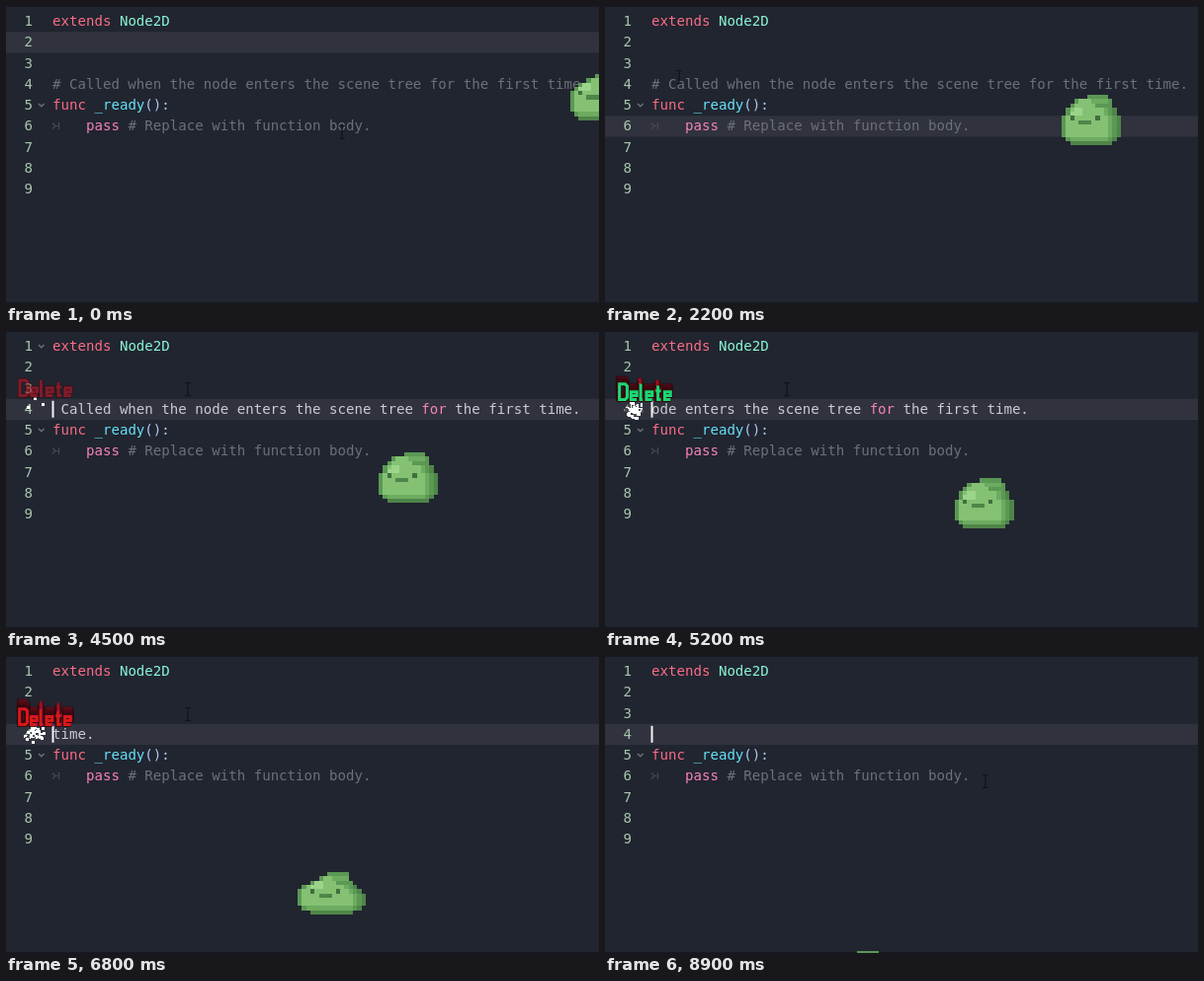
Recreate the animation shown at these times as an HTML page. Size 600x301 px, loop 9 s.

```html
<!DOCTYPE html>
<html lang="en">
<head>
<meta charset="utf-8">
<title>Editor with a slime</title>
<style>
  html, body { margin: 0; width: 100%; height: 100%; overflow: hidden; background: #212530; }
  svg { display: block; width: 600px; height: 301px; }
  text { font: 14.1px "DejaVu Sans Mono", "Liberation Mono", monospace; white-space: pre; }
  .key { fill: #fa6c84; } .type { fill: #88f5d3; } .comment { fill: #6c7079; }
  .fn { fill: #66e0f8; } .sym { fill: #abc9f5; } .flow { fill: #f583b8; }
  .plain { fill: #c9cbd0; } .num { fill: #a9c6ae; }
</style>
</head>
<body>
<svg id="stage" viewBox="0 0 600 301" xmlns="http://www.w3.org/2000/svg">
  <rect width="600" height="301" fill="#212530"/>
  <rect id="row" width="600" height="21.3" fill="#30323d"/>
  <path d="M0 .5H600M0 300.5H600" stroke="#171a25"/>
  <g id="code"></g>
  <g fill="none" stroke="#6c7078" stroke-width="1.4">
    <path id="fold" d="M33 14l2.800 2.800 2.800-2.800"/>
    <path d="M33 99l2.800 2.800 2.800-2.800"/>
    <path d="M47 118.500l3 3-3 3M53.500 118v7M50.500 121.500h2" stroke="#464a54" stroke-width="1.2"/>
  </g>
  <text id="line4" x="47" y="84"></text>
  <rect id="caret" width="2" height="17" fill="#f2f3f5"/>
  <g id="slime" shape-rendering="crispEdges"></g>
  <g id="burst" shape-rendering="crispEdges"></g>
  <g id="labels"></g>
  <path id="beam" d="M-3-6.500h2.500l.5.500.5-.500H3M0-6V6M-3 6.500h2.500L0 6l.500.500H3" fill="none" stroke="#101218" stroke-width="1.2"/>
  <path id="arrow" d="M0 0V15l3.500-3 2.500 5 2.500-1-2.300-5H11Z" fill="#fff" stroke="#22252d" stroke-width=".6"/>
</svg>
<script>
const LOOP = 9000, STEP = 100, LINE = 21.25, CHAR = 8.49, PIXEL = 4.27;
const el = id => document.getElementById(id);
const span = (cls, s) => `<tspan class="${cls}">${s}</tspan>`;
const rect = (x, y, w, h, fill) => `<rect x="${x}" y="${y}" width="${w}" height="${h}" fill="${fill}"/>`;
const rowTop = n => 5 + LINE * (n - 1);
const baseline = n => rowTop(n) + 15.2;
const noise = n => { const v = Math.sin(n * 127.1 + 3.7) * 43758.5453; return v - Math.floor(v); };

const COMMENT = "# Called when the node enters the scene tree for the first time.";
const CLICK_BODY = 200, CLICK_COMMENT = 3500, FIRST_DELETE = 4100, LAST_DELETE = 7000;
const BURST_LIFE = 480, LABEL_LIFE = 1000;

// Each track lists [time, value...]; values are interpolated linearly.
const deletions = [[4500, 1], [5800, 35.3], [6800, 59.5], [7000, 64]];
const mouse = [[0, 340, 128], [200, 385, 123], [1100, 380, 124], [2200, 75, 72], [2900, 46, 79],
  [3700, 46, 79], [4400, 184, 59], [8000, 184, 59], [8700, 385, 127]];
const slimePath = [[0, 600, 116], [2200, 492, 141], [3200, 442.5, 152], [3610, 422.5, 156.5],
  [4040, 422.5, 156.5], [4500, 407, 174], [5800, 363.5, 223], [6800, 329.5, 262], [8900, 259.5, 342]];

function track(keys, t) {
  if (t <= keys[0][0]) return keys[0].slice(1);
  const i = keys.findIndex(k => k[0] > t);
  if (i < 0) return keys[keys.length - 1].slice(1);
  const a = keys[i - 1], b = keys[i], f = (t - a[0]) / (b[0] - a[0]);
  return a.slice(1).map((v, j) => v + (b[j + 1] - v) * f);
}

const deletedAt = t => t < FIRST_DELETE ? 0 : Math.floor(track(deletions, t)[0]);
const deleteTimes = [];
for (let t = FIRST_DELETE; t <= LAST_DELETE; t += 2)
  while (deleteTimes.length < deletedAt(t)) deleteTimes.push(t);

// Slime poses: size in px, left and right inset of each pixel row, and face position in cells.
const low = { w: 59, h: 47, left: "64210000012", right: "33321000013", eye: [2, 4], mouth: 5 };
const normal = { w: 60, h: 51, left: "632110000012", right: "322110000012", eye: [2, 5], mouth: 6 };
const tall = { w: 51, h: 55, left: "5311000000012", right: "2211000000012", eye: [1, 5], mouth: 6 };
const flat = { w: 69, h: 43, left: "7531000013", right: "4432100013", eye: [3, 4], mouth: 5 };
const hop = [low, normal, tall, normal, low, flat, flat];

function slimeMarkup(pose) {
  const rows = pose.left.length, cols = Math.round(pose.w / PIXEL);
  const [ex, ey] = pose.eye;
  const dark = "#4f8549", edge = "#5b9854", shade = "#6dab60", body = "#84c173", light = "#9bd48b";
  let out = "";
  for (let y = 0; y < rows; y++) {
    const l = +pose.left[y], r = cols - pose.right[y], fromBottom = rows - 1 - y;
    out += rect(l, y, r - l, 1, fromBottom ? edge : dark);
    if (!y || !fromBottom) continue;
    out += rect(l + 1, y, r - l - 3, 1, fromBottom > 1 ? body : shade);
    if (y > 2) out += rect(r - 1, y, 1, 1, dark) + rect(r - 3, y, 1, 1, shade);
  }
  out += rect(cols / 2, 1, 4, 1, shade) + rect(cols / 2 + 1, 2, 2, 1, edge);
  out += rect(ex + 1, ey - 2, 2, 2, light) + rect(ex, ey - 1, 1, 1, light);
  out += rect(ex, ey, 1, 1, "#426e3e") + rect(ex + 6, ey, 1, 1, "#426e3e");
  return out + rect(ex + 2, pose.mouth, 3, 1, dark);
}

// Blocky lettering of the key name, drawn as strokes on a 2 px grid.
const e = x => `M${x + 3} 8H${x}V4H${x + 3}V6H${x}`;
const WORD = `M0 0H3L4 1V7L3 8H0Z${e(6)}M11 0V8H12${e(14)}M20 1V8H21.500M18.800 3.500H21.500${e(23.5)}`;

// A fresh label flashes in its own hue, then turns dark red while it rises and fades.
function labelMarkup(n, age) {
  const fresh = age < 100, hue = fresh ? (n - 1) * 68.28 % 360 : 355;
  const x = 14 + (noise(n) - .5) * 1.5, y = 54 - age / 100;
  const stroke = (color, w) => `<path d="${WORD}" fill="none" stroke="${color}" stroke-width="${w}"/>`;
  return `<g transform="translate(${x} ${y}) scale(1.95)" opacity="${1 - age / LABEL_LIFE}">` +
    stroke("#30090f", 2.5) + stroke(`hsl(${hue} 80% ${fresh ? 47 : 42}%)`, 1.55) + "</g>";
}

function burstMarkup(n, age) {
  const life = age / BURST_LIFE, count = Math.round(9 * (1 - life)) + 2, size = 2.2 + life;
  let out = "";
  for (let i = 0; i < count; i++) {
    const angle = noise(n * 17 + i) * 6.283, radius = (3 + 6 * life) * (.4 + noise(n + i * 31));
    const x = 30 + Math.cos(angle) * radius, y = 79 + Math.sin(angle) * radius;
    out += rect(x - size / 2, y - size / 2, size, size, i % 4 === 3 ? "#4a4b54" : "#fff");
  }
  return out;
}

function remaining(n) {
  const rest = COMMENT.slice(n);
  return n ? span("plain", rest.replace(/\b(for|or)\b/g, span("flow", "$1"))) : span("comment", rest);
}

const lines = {
  1: span("key", "extends ") + span("type", "Node2D"),
  5: span("key", "func ") + span("fn", "_ready") + span("sym", "():"),
  6: "    " + span("flow", "pass ") + span("comment", "# Replace with function body.")
};
let code = "";
for (let n = 1; n <= 9; n++) {
  code += `<text class="num" x="18.500" y="${baseline(n)}">${n}</text>`;
  if (lines[n]) code += `<text x="47" y="${baseline(n)}">${lines[n]}</text>`;
}
el("code").innerHTML = code;

function caretOn(t) {
  if (t < CLICK_BODY) return false;
  if (t >= FIRST_DELETE && t < LAST_DELETE) return true;
  const since = t < CLICK_COMMENT ? CLICK_BODY : t < FIRST_DELETE ? CLICK_COMMENT : LAST_DELETE;
  return (t - since) % 1300 < 650;
}

function draw(t) {
  const active = t < CLICK_BODY ? 2 : t < CLICK_COMMENT ? 6 : 4;
  el("row").setAttribute("y", rowTop(active));

  const n = deletedAt(t);
  el("line4").innerHTML = remaining(n);
  el("fold").style.display = COMMENT[n] === " " ? "" : "none";

  el("caret").setAttribute("x", active === 6 ? 47 + CHAR * 38 : 46.5);
  el("caret").setAttribute("y", rowTop(active) + 2);
  el("caret").style.display = caretOn(t) ? "" : "none";

  const pose = hop[t / STEP % hop.length], [x, bottom] = track(slimePath, t);
  const cols = Math.round(pose.w / PIXEL);
  el("slime").innerHTML = slimeMarkup(pose);
  el("slime").setAttribute("transform", `translate(${x - pose.w / 2} ${bottom - pose.h}) ` +
    `scale(${pose.w / cols} ${pose.h / pose.left.length})`);

  let labels = "", bursts = "";
  deleteTimes.forEach((start, i) => {
    const age = t - start;
    if (age < 0) return;
    if (age < LABEL_LIFE) labels += labelMarkup(i + 1, age);
    if (age < BURST_LIFE) bursts += burstMarkup(i + 1, age);
  });
  el("labels").innerHTML = labels;
  el("burst").innerHTML = bursts;

  const [mx, my] = track(mouse, t), gutter = mx < 47;
  for (const [id, shown] of [["beam", !gutter], ["arrow", gutter]]) {
    el(id).setAttribute("transform", `translate(${mx} ${my})`);
    el(id).style.display = shown ? "" : "none";
  }
}

const origin = performance.now();
let shown = -1;
function tick() {
  const t = Math.floor((performance.now() - origin) % LOOP / STEP) * STEP;
  if (t !== shown) draw(shown = t);
  requestAnimationFrame(tick);
}
tick();
</script>
</body>
</html>
```
